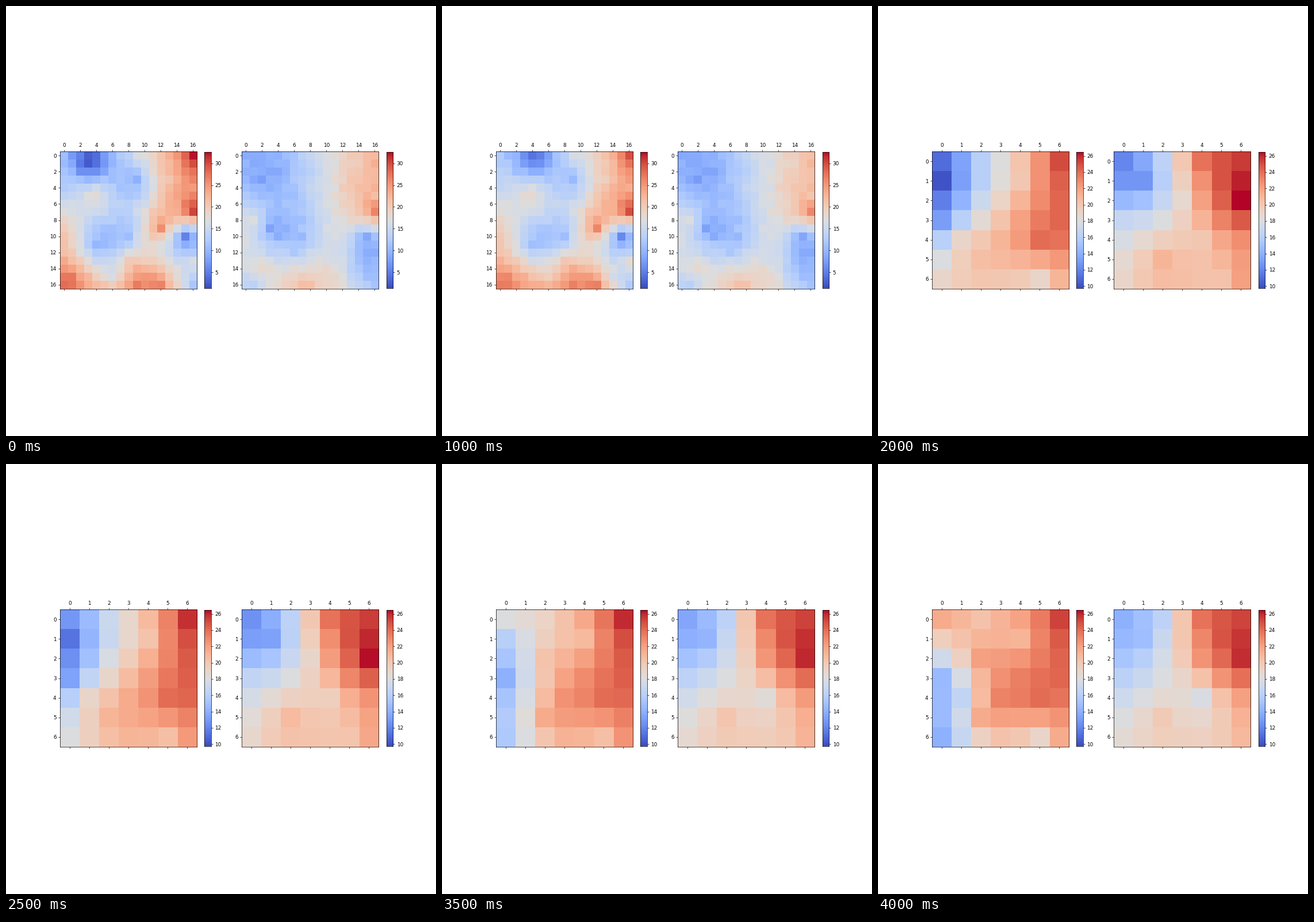
Recreate the animation shown at these times as a matplotlib script. Size 748 by 748 pixels, loop 4500 ms.

```python
import numpy as np
import matplotlib.pyplot as plt
from matplotlib.animation import FuncAnimation

STAGE, DPI = 748, 64

# Key points of each field: column, row, then the value at each key time
WIDE_WARM = [
    (0, 0, 11, 13), (8, 1, 12.5, 13.5), (3, 3, 12.5, 15.5), (9, 3, 10, 12),
    (11, 2, 18, 15.5), (14, 1, 24, 20), (16, 0, 32, 27), (0, 5, 14, 17),
    (4, 5, 18, 19), (8, 5, 11.5, 14.5), (12, 6, 21, 21), (16, 4, 24.5, 21.5),
    (16, 7, 30, 29), (0, 9, 20.5, 19.5), (4, 11, 9.5, 11.5), (8, 10, 11, 11),
    (12, 9, 25, 26), (15, 10, 5, 6), (16, 8.5, 17, 16), (12, 11, 16.5, 17),
    (8, 13, 20, 20.5), (16, 13, 16, 19), (1, 15, 27, 25), (6, 15, 16.5, 23.5),
    (9, 16, 26.5, 26), (12, 16, 26, 26.5), (14, 15, 17, 13.5),
    (16, 16, 12, 13.5),
]
WIDE_COOL = [
    (0, 0, 9.5), (2, 3, 8), (5, 3, 10), (8, 5, 14), (11, 2, 17.5),
    (16, 1, 22.5), (16, 5, 22), (16, 7, 26), (13, 8, 18.5), (1, 8, 16.5),
    (0, 11, 16.5), (3, 9, 8.5), (3, 6, 11.5), (7, 10, 11), (11, 10, 16.5),
    (15, 10, 8.5), (16, 8.6, 17), (15, 14, 10), (12, 13, 15.5), (7, 16, 21.5),
    (2, 14, 18), (6, 12, 12.5), (1, 16, 13.5), (16, 16, 11.5), (11, 15, 18.5),
]
CLOSE_LEFT = [
    (0, 0, 11, 14.5, 21.5), (0, 1, 10, 12.5, 19.5), (0, 3, 13, 13.5, 14.5),
    (0, 6, 19, 17, 14), (2, 0, 16, 18, 20.3), (2, 2, 17, 18.5, 22),
    (1, 4, 19, 19, 16.5), (3, 4, 21, 22, 23.2), (2, 5, 20.5, 21.5, 21.5),
    (3, 6, 20, 22, 20.3), (5, 6, 19, 22, 19), (4, 1, 20, 20.5, 21),
    (5, 4, 24, 24, 24), (6, 0, 25, 26.5, 25.3), (6, 6, 21, 23.5, 21.5),
]
CLOSE_RIGHT = [
    (0, 0, 12, 14), (1, 1, 12.7, 14.8), (0, 3, 16.7, 16.2), (0, 6, 19, 18.5),
    (2, 0, 16.3, 16.3), (4, 0, 23.8, 23.8), (6, 0, 25.5, 25.2),
    (3, 2, 18.7, 19.7), (4, 2, 22, 22.5), (6, 2, 26.5, 25.8),
    (5, 3, 23.2, 22.5), (4, 4, 20, 17.8), (2, 5, 21, 19.8), (6, 4, 22.7, 22),
    (5, 6, 20.3, 19.8), (6, 6, 22, 20.8),
]


def field(points, n, t=0.0):
    """Radial interpolation of the key points over n x n cells, t in 0..1."""
    pts = np.array(points, float)
    xy, keys = pts[:, :2], pts[:, 2:]
    times = np.linspace(0, 1, keys.shape[1])
    goal = np.array([np.interp(t, times, k) for k in keys])
    mean = goal.mean()
    dist = lambda p: np.hypot(*(p[:, None] - xy[None]).transpose(2, 0, 1))
    weights = np.linalg.solve(dist(xy), goal - mean)
    rows, cols = np.indices((n, n))
    cells = np.column_stack([cols.ravel(), rows.ravel()])
    return (mean + dist(cells) @ weights).reshape(n, n)


def grain(seed, n):
    return np.random.default_rng(seed).normal(0, 0.4, (n, n))


def wide_maps(step):
    n = 17
    y, x = np.indices((n, n))
    # A cold pool drifts right along the top edge and fades
    pool = np.exp(-((x - 3.3 - step) / 2.2) ** 2
                  - ((y - 0.6 + 0.4 * step) / 2) ** 2)
    left = field(WIDE_WARM, n, step / 2) - (10 - step ** 2) * pool
    right = field(WIDE_COOL, n) - step * np.where((x > 10) & (y < 7), 0.8, 0.2)
    return left + grain(3, n), right + grain(8, n)


def close_maps(step):
    t = step / 4
    return field(CLOSE_LEFT, 7, t), field(CLOSE_RIGHT, 7, t)


fig = plt.figure(figsize=(STAGE / DPI, STAGE / DPI), dpi=DPI,
                 facecolor="white")


def axes_px(x, y, w, h):
    return fig.add_axes([x / STAGE, 1 - (y + h) / STAGE, w / STAGE, h / STAGE])


class Panel:
    def __init__(self, x):
        style = dict(cmap="coolwarm", aspect="auto", interpolation="nearest")
        self.ax = axes_px(x, 253.4, 238.2, 238.2)
        self.ax.tick_params(top=True, labeltop=True, labelbottom=False)
        self.img = self.ax.imshow(np.zeros((2, 2)), **style)
        self.bar = axes_px(x + 251.4, 253.6, 11.9, 237.8)
        self.bar.yaxis.tick_right()
        ramp = np.linspace(0, 1, 256)[:, None]
        self.ramp = self.bar.imshow(ramp, origin="lower", **style)

    def show(self, z, lo, hi, tick, bar_ticks):
        n = len(z)
        edge = (-0.5, n - 0.5)
        self.img.set_data(z)
        self.img.set_clim(lo, hi)
        self.img.set_extent((*edge, *edge[::-1]))
        self.ax.set(xticks=range(0, n, tick), yticks=range(0, n, tick),
                    xlim=edge, ylim=edge[::-1])
        self.ramp.set_extent((0, 1, lo, hi))
        self.bar.set(xticks=[], yticks=bar_ticks, xlim=(0, 1), ylim=(lo, hi))


panels = [Panel(93.9), Panel(410.1)]


def draw(i):
    if i < 4:
        maps = wide_maps(max(i - 1, 0))
        look = (1.26, 32.65, 2, range(5, 31, 5))
    else:
        maps = close_maps(i - 4)
        look = (9.7, 26.5, 1, range(10, 27, 2))
    for panel, z in zip(panels, maps):
        panel.show(z, *look)
    return []


anim = FuncAnimation(fig, draw, frames=9, interval=500, repeat=True,
                     repeat_delay=0, blit=False)
plt.show()
```
